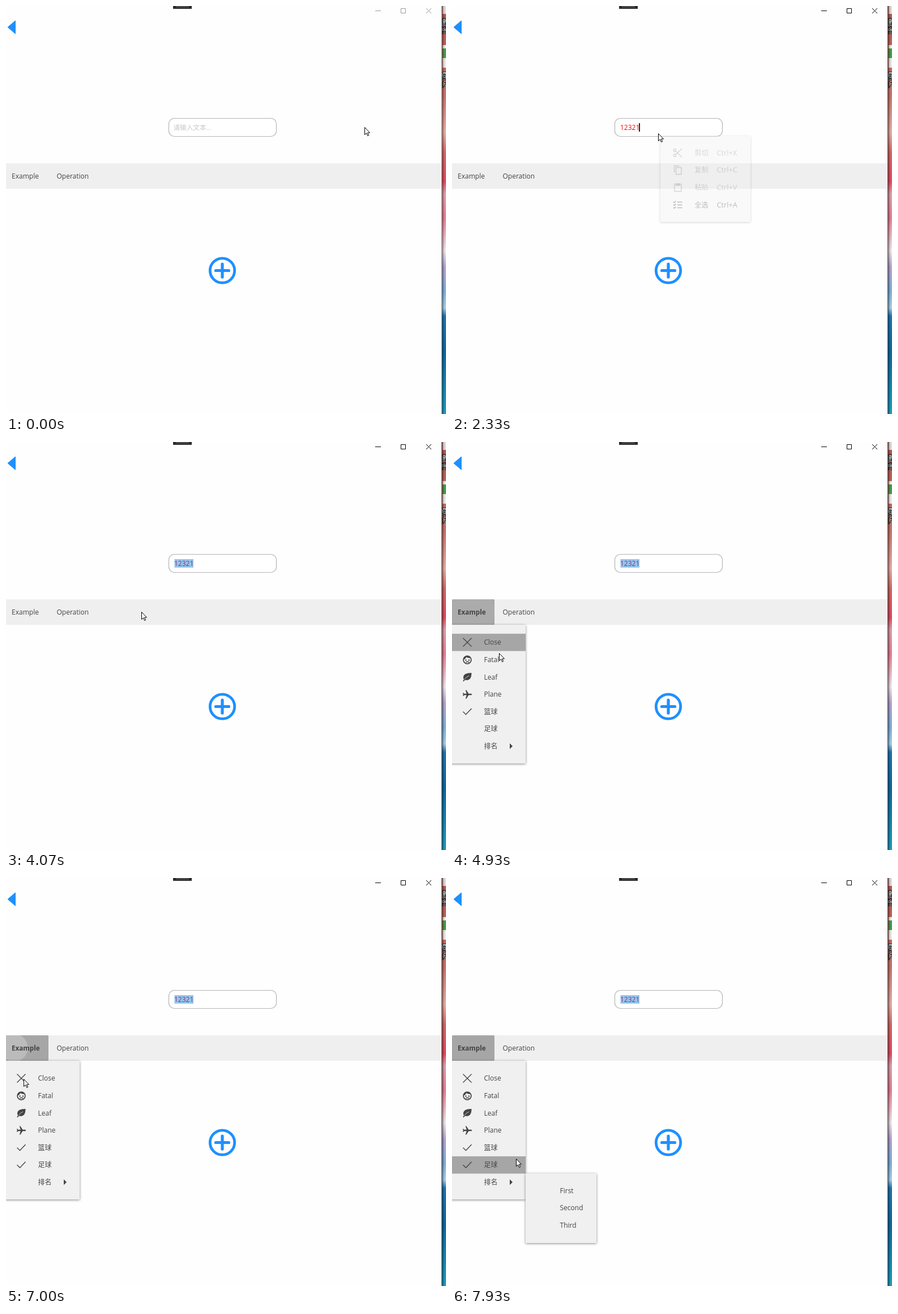
Write an HTML page that moves like this. It is 777 px wide and 721 px high and loops after 8000 ms.

```html
<!DOCTYPE html>
<html lang="zh">
<head>
<meta charset="utf-8">
<style>
html, body { margin: 0; width: 100%; height: 100%; overflow: hidden; background: #fff; }
svg { display: block; width: 777px; height: 721px; }
text { font: 12px "Open Sans", "Noto Sans CJK SC", "Noto Sans CJK", sans-serif; fill: #444; white-space: pre; }
.ico { fill: none; stroke: #444; stroke-width: 1.4; }
.solid { fill: #444; stroke: none; }
.panel { fill: #f0f0f0; filter: drop-shadow(0 1px 2px #0007); }
.hover { fill: #a6a6a6; }
.desk text { fill: #fff; stroke: #111; stroke-width: 2px; paint-order: stroke; }
</style>
</head>
<body>
<svg viewBox="0 0 777 721">
  <defs>
    <linearGradient id="sky" x2="0" y2="1">
      <stop offset="0" stop-color="#b9584f"/><stop offset=".22" stop-color="#d0766c"/>
      <stop offset=".31" stop-color="#edb0a8"/><stop offset=".36" stop-color="#d96a68"/>
      <stop offset=".43" stop-color="#ea4a62"/><stop offset=".46" stop-color="#e2a3ae"/>
      <stop offset=".52" stop-color="#f07f96"/><stop offset=".6" stop-color="#f4e6ec"/>
      <stop offset=".64" stop-color="#b9a8d4"/><stop offset=".7" stop-color="#7fb4e2"/>
      <stop offset=".74" stop-color="#a9d3ee"/><stop offset=".76" stop-color="#1f78b8"/>
      <stop offset=".85" stop-color="#0f6ba6"/><stop offset="1" stop-color="#1ba3c6"/>
    </linearGradient>
    <linearGradient id="edge"><stop stop-opacity=".5"/><stop offset="1" stop-opacity="0"/></linearGradient>
    <clipPath id="tab"><rect y="278" width="75" height="45"/></clipPath>
  </defs>
  <g class="desk">
    <rect x="769" width="8" height="721" fill="url(#sky)"/>
    <rect x="771" width="6" height="14" fill="#e4dcdc"/>
    <rect x="771" y="69" width="6" height="40" fill="#ececec"/>
    <rect x="771" y="75" width="6" height="17" fill="#3fa648"/>
    <text x="766" y="33">建</text><text x="767" y="48">档</text>
    <text x="766" y="128">照</text><text x="768" y="142">(F</text>
    <rect x="769" width="6" height="721" fill="url(#edge)"/>
  </g>
  <rect width="769" height="721" fill="#fefefe"/>
  <path id="border" d="M769.5 0V721" stroke="#777"/>
  <path d="M295 0h33v5h-33z" fill="#2b2b2b"/><path d="M300 1.5h23" stroke="#777"/>
  <path d="M3 37.5 16.500 26V49z" fill="#1e90ff" stroke="#1e90ff" stroke-linejoin="round"/>
  <path id="buttons" d="M652 8.500h10M697.500 4.500h8v8h-8zM742 4l9 9m0-9-9 9" fill="none"/>
  <rect x="287.500" y="198.500" width="190" height="32" rx="10" fill="#fff" stroke="#b5b5b5" stroke-width="1.200"/>
  <rect id="selection" x="297.500" y="207" width="33.500" height="15" fill="#94c5ee"/>
  <text id="hint" x="295.500" y="219" style="font-size:11.600px;fill:#c6c6c6">请输入文本...</text>
  <text id="typed" x="297" y="219"></text>
  <path id="caret" stroke="#000" stroke-width="1.700"/>
  <rect y="278" width="769" height="45" fill="#efefef"/>
  <g id="tabOn">
    <rect class="hover" y="278" width="75" height="45" rx="1.500"/>
    <circle id="ripple" cy="300" fill="#fff" clip-path="url(#tab)"/>
  </g>
  <text id="tabText" x="10" y="304.500">Example</text>
  <text x="89.500" y="304.500">Operation</text>
  <g fill="none" stroke="#1e90ff">
    <circle cx="382" cy="467.500" r="21.700" stroke-width="4.800"/>
    <path d="M370.500 467.500h23M382 456v23" stroke-width="5.200" stroke-linecap="round"/>
  </g>
  <g id="menu">
    <rect class="panel" x="-3" y="323" width="133" height="245"/>
    <rect id="menuHover" class="hover" width="130" height="30.600"/>
    <g class="ico">
      <path d="M19.500 346.500l15 15m0-15-15 15M19.500 476.500l5 5 10-10.500"/>
      <path id="check" d="M19.500 507l5 5 10-10.500"/>
      <circle cx="27" cy="385" r="6.900" stroke-width="1.700"/>
      <path class="solid" d="M20 385a7 7 0 0 1 13-3.500q-5 1-7.500-1.500-1.500 3.500-5.500 5z"/>
      <circle class="solid" cx="24.500" cy="385.500" r="1.200"/><circle class="solid" cx="30" cy="385.500" r="1.200"/>
      <path d="M24.500 389.500q3-2.500 5.500 0"/>
      <path class="solid" d="M34.500 408Q20 408 20 416q0 2 1 3.500-1.500 2-1.500 3.500h1.500l1.500-2.500Q34.500 423 34.500 408z"/>
      <path d="M22 419.500q3-4.500 8-6.500" stroke="#eee" stroke-width=".8" style="stroke:#eee"/>
      <path class="solid" transform="translate(27 446) rotate(90) scale(.8) translate(-11.500 -12)"
        d="M21 16v-2l-8-5V3.500a1.500 1.500 0 0 0-3 0V9l-8 5v2l8-2.500V19l-2 1.500V22l3.500-1 3.500 1v-1.500L13 19v-5.500z"/>
      <path class="solid" d="M102 532.500l5 5-5 5z"/>
    </g>
  </g>
  <g id="sub"><rect class="panel" x="130" y="522" width="125" height="123"/></g>
  <g id="popup">
    <rect class="panel" x="368" y="230" width="159" height="151.500"/>
    <rect id="popHover" class="hover" x="368" y="336.200" width="159" height="30.600"/>
    <g class="ico">
      <g opacity=".55">
        <circle cx="393.500" cy="255" r="2.200"/><circle cx="393.500" cy="264" r="2.200"/>
        <path d="M395 256.500 406 267M395 262.500 406 252"/>
        <path d="M392.500 294v-11.500h9M395.500 285.500h9.500v12h-9.500z"/>
        <path d="M393 315h12v12.500h-12z"/><path d="M396 314h6v3h-6z" fill="#444"/>
      </g>
      <path d="M398 346.500h8.500M398 351.500h8.500M398 356.500h8.500M391 346l1.500 1.500 3-3M391 351l1.500 1.500 3-3M391 356l1.500 1.500 3-3"/>
    </g>
  </g>
  <path id="arrow" d="M.5.5V13.500l3-2.800 2.200 4.800 2-1-2.200-4.500h4z" fill="#fff" stroke="#000" stroke-linejoin="round"/>
  <path id="beam" d="M-3.500-7.500h3M.5-7.500h3M0-7V7M-3.500 7.500h3M.5 7.500h3" fill="none" stroke="#111"/>
</svg>
<script>
const $ = id => document.getElementById(id);
const set = (id, attrs) => { for (const k in attrs) $(id).setAttribute(k, attrs[k]); };
const show = (id, alpha) => set(id, { opacity: +alpha });
const clamp = v => Math.max(0, Math.min(1, v));
const ROW = 30.6;

function label(parent, str, x, y, alpha = 1, size = 12) {
  const el = document.createElementNS('http://www.w3.org/2000/svg', 'text');
  el.setAttribute('x', x);
  el.setAttribute('y', y + 4.3);
  el.setAttribute('opacity', alpha);
  el.style.fontSize = size + 'px';
  el.textContent = str;
  $(parent).append(el);
}
['Close', 'Fatal', 'Leaf', 'Plane', '篮球', '足球', '排名'].forEach((s, i) => label('menu', s, 56.5, 354 + i * ROW));
['First', 'Second', 'Third'].forEach((s, i) => label('sub', s, 190.5, 552.5 + i * ROW));
['剪切X', '复制C', '粘贴V', '全选A'].forEach((s, i) => {
  const y = 259.5 + i * ROW, alpha = i < 3 ? .55 : 1;
  label('popup', s.slice(0, 2), 428.5, y, alpha);
  label('popup', 'Ctrl+' + s[2], 467.5, y, alpha, 12.8);
});

// Pointer path: time, x, y
const path = [
  [70, 633, 214], [420, 62, 312], [520, 66, 308], [870, 362, 216], [2000, 362, 216], [2130, 367, 228],
  [2329, 367, 228], [2330, 364, 225], [2600, 364, 225], [2730, 364, 245], [3400, 425, 356], [3600, 425, 356],
  [4070, 240, 300], [4400, 30, 302], [4600, 30, 302], [4860, 74, 355], [4930, 83, 373], [5270, 76, 477],
  [5330, 76, 469], [5530, 76, 469], [5670, 76, 461], [5740, 76, 462], [6000, 77, 508], [6470, 77, 508],
  [6720, 14, 300], [6860, 14, 300], [7000, 31, 355], [7270, 68, 465], [7530, 74, 535], [7700, 82, 538],
  [7930, 113, 496]
];
function pointer(t) {
  const i = path.findIndex(p => p[0] > t);
  if (i < 0) return path[path.length - 1].slice(1);
  if (!i) return path[0].slice(1);
  const a = path[i - 1], b = path[i], k = (t - a[0]) / (b[0] - a[0]);
  return [a[1] + (b[1] - a[1]) * k, a[2] + (b[2] - a[2]) * k];
}
const inside = ([px, py], x, y, w, h) => px >= x && px < x + w && py >= y && py < y + h;

function draw(t) {
  const pos = pointer(t), late = pointer(t - 70);
  const active = t >= 930, selected = t >= 3600;

  set('buttons', { stroke: active ? '#000' : '#999' });
  set('border', { stroke: active ? '#555' : '#888' });

  const count = [1670, 1740, 1870, 1930, 2000].filter(k => t >= k).length;
  $('typed').textContent = '12321'.slice(0, count);
  $('typed').style.fill = selected ? '#96306f' : '#f00';
  show('hint', !count);
  show('selection', selected);
  show('caret', active && !selected);
  set('caret', { d: `M${297.5 + count * 6.7} 207v15` });

  show('popup', t < 2330 ? 0 : t < 3600 ? clamp(.35 + (t - 2330) / 350) : clamp(1 - (t - 3600) / 200));
  show('popHover', inside(late, 368, 336, 159, ROW));

  // Menu opens twice and closes after the second check is set
  const first = t < 6270, click = first ? 4470 : 6750, age = t - click;
  const open = age >= 0;
  const closing = t >= 6200 && first ? .5 : 1;
  show('menu', open ? closing * clamp(.3 + age / 180) : 0);
  show('tabOn', open || inside(pos, 0, 278, 75, 45));
  $('tabText').style.fontWeight = open || inside(pos, 0, 278, 75, 45) ? 700 : 400;
  $('tabText').style.fontSize = $('tabText').style.fontWeight == 700 ? '11.7px' : '12px';
  set('ripple', { cx: first ? 30 : 14, r: Math.max(0, age * .098) });
  show('ripple', open ? clamp(.45 * (1 - age / 520)) : 0);
  show('check', t >= 6200);

  const row = Math.floor((late[1] - 338.8) / ROW);
  show('menuHover', open && row >= 0 && row < 7 && late[0] < 130);
  set('menuHover', { y: 338.8 + row * ROW });
  show('sub', t < 7530 ? 0 : clamp(.3 + (t - 7530) / 180));

  const editing = t < 2330 && inside(pos, 287, 198, 191, 33);
  show('arrow', !editing);
  show('beam', editing && !(t >= 1400 && t < 1530));
  set('arrow', { transform: `translate(${pos.map(Math.round)})` });
  set('beam', { transform: `translate(${pos.map(v => Math.round(v) + .5)})` });
}

function frame() {
  draw(performance.now() % 8000);
  requestAnimationFrame(frame);
}
frame();
</script>
</body>
</html>
```
